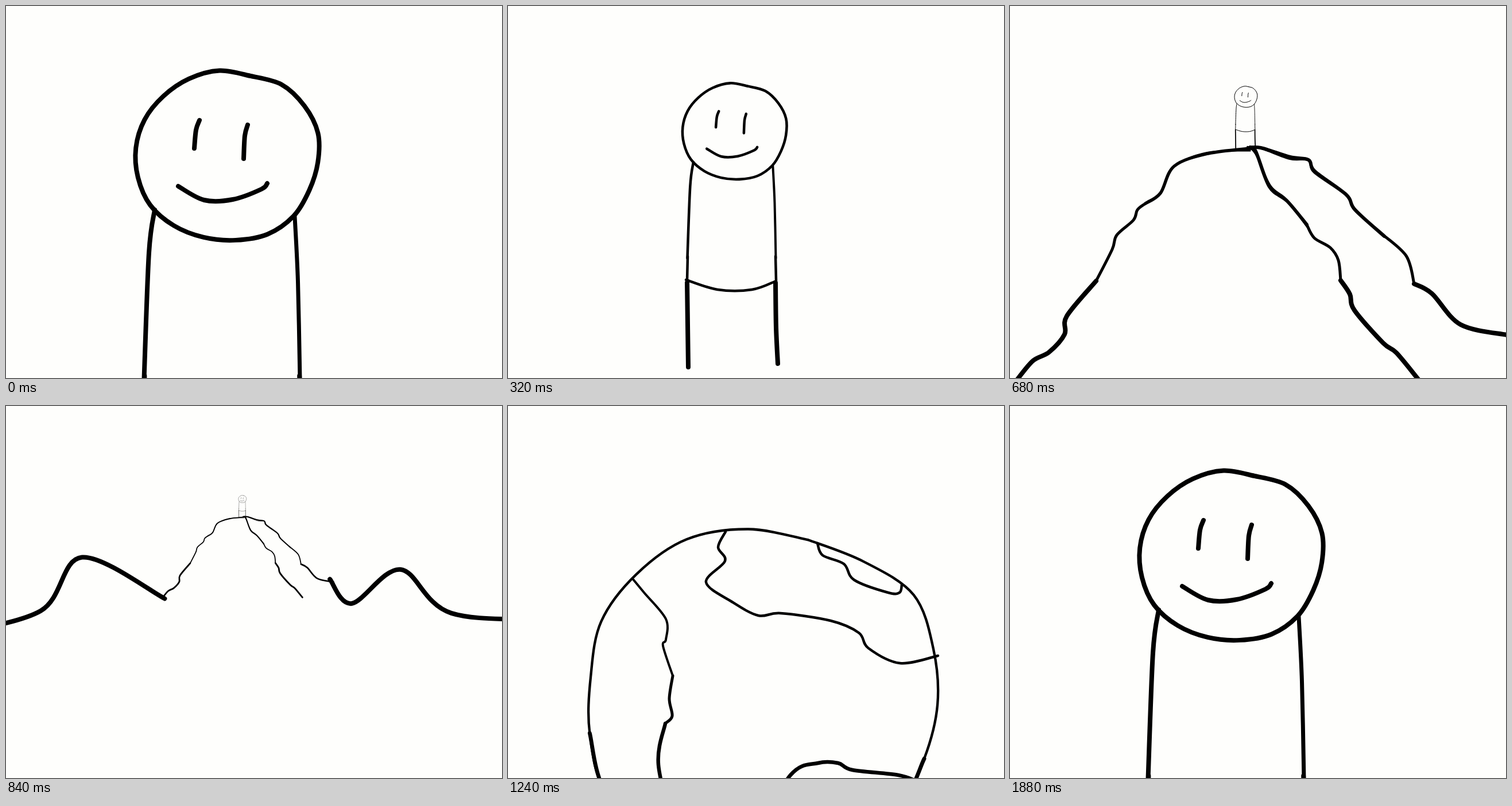
An HTML page with a canvas that plays this animation: 864 px wide and 648 px high, repeating every 1920 ms.

```html
<!DOCTYPE html>
<html>
<head>
<meta charset="utf-8">
<style>
html, body { margin: 0; width: 100%; height: 100%; overflow: hidden; background: #fefefc; }
canvas { display: block; }
</style>
</head>
<body>
<canvas id="stage" width="864" height="648"></canvas>
<script>
const ctx = document.getElementById('stage').getContext('2d');
const LOOP = 1920, STEP = 40, PEN = 8;
ctx.lineCap = ctx.lineJoin = 'round';

// Camera: time, log of the zoom, screen place of the head's centre
const camera = [
  [0, 0, 386, 260], [320, -.567, 395, 218], [680, -2.083, 411, 158],
  [1040, -4.58, 411, 181], [1240, -5.8, 414.7, 201], [1560, -6.53, 395, 170]
];

const lerp = (a, b, u) => a + (b - a) * u;
const mixList = (a, b, u) => a.map((v, i) => lerp(v, b[i], u));
const mix = (a, b, u) => a.map((p, i) => mixList(p, b[i], u));
const pts = text => text.split(' ').map(p => p.split(',').map(Number));

let seed = 1;
const jitter = size => {
  const n = Math.sin(seed++ * 12.9898) * 43758.5453;
  return (n - Math.floor(n) - .5) * size;
};

const line = (width, text) => [{ width, points: pts(text) }];
// A line gone over again with a thin, unsteady pen
const sketch = (width, text) => [
  ...line(width, text),
  { width: 2.5, points: pts(text).map(([x, y]) => [x + jitter(9), y + jitter(9)]) }
];

// Ellipse whose radius differs by some percent every 20 degrees, clockwise from the top
const blob = ([cx, cy, rx, ry], percents) => percents.map((p, i) => {
  const angle = (i * 20 - 75) * Math.PI / 180, r = 1 + p / 100;
  return [cx + rx * r * Math.cos(angle), cy + ry * r * Math.sin(angle)];
});

const head = {
  ball: [386, 260, 161, 148],
  bumps: [-3.4, 1.7, 1.4, 1.2, -2, -2.5, 1.1, 2.5, .3, 0, 1.2, 2.2, .4, -.4, -.9, -1.7, -.8, 0, -3.4],
  legs: [pts('259,355 249,430 240.5,650'), pts('503,367 508.5,480 512,650')],
  marks: [
    pts('337,199 331,216 328,248'),
    pts('421,207 416,226 414,266'),
    pts('300,314 345,338 395,337 445,319 455,309')
  ]
};
const globe = {
  ball: [410, 312, 147, 134],
  bumps: [-2.3, -1.2, 4.4, .2, -.5, 1, 7.5, 5, 1, 2.2, 8.5, 10.5, 3, -.7, 2.5, 3, 4.5, 1.5, -2.3],
  legs: [pts('301,425 292,470 291,492'), pts('497,437 499,474 501,510')],
  marks: [
    pts('366,183 338,228 322,258 322,322 333,391 382,446'),
    pts('350,205 378,265 377,298 391,352 368,440'),
    pts('425,181 420,187 430,200 419,244 457,265 500,262 510,271 554,282'),
    pts('489,203 502,223 531,233')
  ]
};
const globeRim = blob(globe.ball, globe.bumps);

// Each layer: time at which its coordinates are screen pixels, first and last time shown
const layers = [
  { at: 0, from: 0, to: 960, strokes: [
    { width: 8, points: blob(head.ball, head.bumps) },
    ...head.legs.map((points, i) => ({ width: 8 - i, points })),
    ...head.marks.map(points => ({ width: 8, points }))
  ] },
  { at: 320, from: 0, to: 960, strokes: [
    ...line(4.5, '313,436 312,478'),
    ...line(4.5, '466,436 467,478'),
    ...line(4.5, '310,477 365,494 425,494 467,479'),
    ...line(8, '312,482 314,629'),
    ...line(8, '466,482 467,560 470,623')
  ] },
  { at: 680, from: 360, to: 1120, strokes: [
    ...line(8, '13,650 40,618 68,603 95,572 99,540 150,479'),
    ...line(5, '150,479 178,424 186,399 215,373 222,355 236,344'),
    ...sketch(5.5, '236,344 262,326 286,279 345,257 418,248'),
    ...sketch(6, '415,247 437,247 488,263 520,268 531,288 586,329 601,355 652,401'),
    ...line(5, '645,395 690,435 704,484'),
    ...line(8, '704,484 735,501 785,555 866,573'),
    ...sketch(6, '418,248 428,253 452,315 483,340 517,381'),
    ...line(5, '517,381 530,404 558,421 572,443 576,478'),
    ...line(8, '576,478 592,502 600,530 650,587 673,604 711,650')
  ] },
  { at: 1040, from: 720, to: 1040, strokes: [
    ...line(7, '379,222 345,205 328,227 290,237'),
    ...line(8, '290,237 222,238 95,272 48,290 -20,327'),
    ...line(7, '447,214 456,224 476,210 497,228 545,232 590,243 620,239 646,250'),
    ...line(6, '646,251 683,251 735,271'),
    ...line(8, '735,271 765,285 796,288 868,321'),
    ...line(7, '829,308 835,330 866,377'),
    ...sketch(8, '291,238 285,268 244,318 277,367 292,393'),
    ...line(8, '292,393 288,432 222,464 176,527 171,540'),
    ...line(8, '173,525 185,550 237,597 264,601 290,624 354,650')
  ] },
  { at: 1040, from: 920, to: 1120, strokes: [
    ...sketch(8, '328,225 345,206 379,222 405,192 416,190 456,224 476,210 490,224'),
    ...line(4, '428,205 420,240 447,254')
  ] },
  { at: 1240, from: 1080, to: 1400, strokes: [
    ...line(4, '218,302 237,325 275,371 275,407 270,418 287,470'),
    ...line(5, '287,470 281,510 286,540 274,553'),
    ...line(6.5, '274,553 262,625 290,745'),
    ...line(4.5, '379,219 366,246 378,270 345,307 390,341 436,365 475,361 562,374 611,395 628,422 683,448 749,435'),
    ...line(4.5, '539,239 548,260 585,275 603,303 662,325 682,325 686,311'),
    ...line(6.5, '425,755 492,643 540,622 575,622 600,634 680,643 715,655')
  ] },
  { at: 1560, from: 1080, to: 1400, strokes: [
    { width: 2.1, points: globeRim },
    { width: 3.3, points: globeRim.slice(5, 13) }
  ] }
];

// Smooth curve through the camera keys
function view(t) {
  const last = camera.length - 1;
  if (t >= camera[last][0]) return camera[last].slice(1);
  const i = camera.findIndex((k, n) => t < camera[n + 1][0]);
  const a = camera[i], b = camera[i + 1], span = b[0] - a[0], u = (t - a[0]) / span;
  const slope = (n, c) => n === 0 || n === last ? 0 :
    (camera[n + 1][c] - camera[n - 1][c]) / (camera[n + 1][0] - camera[n - 1][0]);
  return [1, 2, 3].map(c =>
    lerp(a[c], b[c], u * u * (3 - 2 * u)) +
    span * u * (1 - u) * (slope(i, c) * (1 - u) - slope(i + 1, c) * u));
}

// Maps coordinates of the moment `at` to the screen at time t
function placer(t, at) {
  const [z, x, y] = view(t), [z0, x0, y0] = view(at);
  const scale = Math.exp(z - z0);
  return { scale, map: p => [x + (p[0] - x0) * scale, y + (p[1] - y0) * scale] };
}

function curve(p, width) {
  if (p.length < 2) return;
  ctx.lineWidth = width;
  ctx.beginPath();
  ctx.moveTo(...p[0]);
  for (let i = 0; i < p.length - 1; i++) {
    const b = p[i], c = p[i + 1], a = p[i - 1] || b, d = p[i + 2] || c;
    ctx.bezierCurveTo(
      b[0] + (c[0] - a[0]) / 6, b[1] + (c[1] - a[1]) / 6,
      c[0] - (d[0] - b[0]) / 6, c[1] - (d[1] - b[1]) / 6, ...c);
  }
  ctx.stroke();
}

// Turns a line about the ball's upright axis and returns its visible runs
function turn(points, from, to, degrees) {
  const angle = degrees * Math.PI / 180, runs = [[]];
  for (const [x, y] of points) {
    const nx = (x - from[0]) / from[2], ny = (y - from[1]) / from[3];
    const w = Math.sqrt(Math.max(.0004, 1 - ny * ny));
    const lon = Math.asin(Math.max(-1, Math.min(1, nx / w)));
    if (Math.abs(lon + angle) > Math.PI / 2 + .001) { runs.push([]); continue; }
    const shifted = nx + w * (Math.sin(lon + angle) - Math.sin(lon));
    runs[runs.length - 1].push([to[0] + shifted * to[2], to[1] + ny * to[3]]);
  }
  return runs;
}

// The globe spins round and becomes the head
function drawTurn(t) {
  const u = Math.max(0, (t - 1560) / 320);
  const grow = Math.min(1, (t - 1440) / 120);
  const spin = 127 * u - 26 * (1 - grow);
  const { map } = placer(t, 1560);
  const ball = mixList(globe.ball, head.ball, u);
  const show = (p, w = lerp(4.5, 8, u)) => curve(p.map(map), w);
  const showMarks = (body, degrees) => body.marks.forEach(mark =>
    turn(mark, body.ball, ball, degrees).forEach(run => show(run)));

  show(blob(ball, mixList(globe.bumps, head.bumps, u)));
  globe.legs.forEach((leg, i) => {
    const stub = leg.map(p => mixList(leg[0], p, grow));
    if (grow) show(mix(stub, head.legs[i], u), lerp(4.5, 8 - i, u));
  });
  showMarks(globe, spin);
  if (u) showMarks(head, spin - 127);
}

function draw(t) {
  ctx.fillStyle = '#fefefc';
  ctx.fillRect(0, 0, 864, 648);
  if (t >= 1880) t = 0;
  if (t >= 1440) return drawTurn(t);
  for (const layer of layers) {
    if (t < layer.from || t > layer.to) continue;
    const { scale, map } = placer(t, layer.at);
    for (const { width, points } of layer.strokes) {
      curve(points.map(map), Math.min(PEN, width * scale));
    }
  }
}

const start = performance.now();
function tick() {
  const t = (performance.now() - start) % LOOP;
  draw(Math.floor(t / STEP) * STEP);
  requestAnimationFrame(tick);
}
tick();
</script>
</body>
</html>
```
